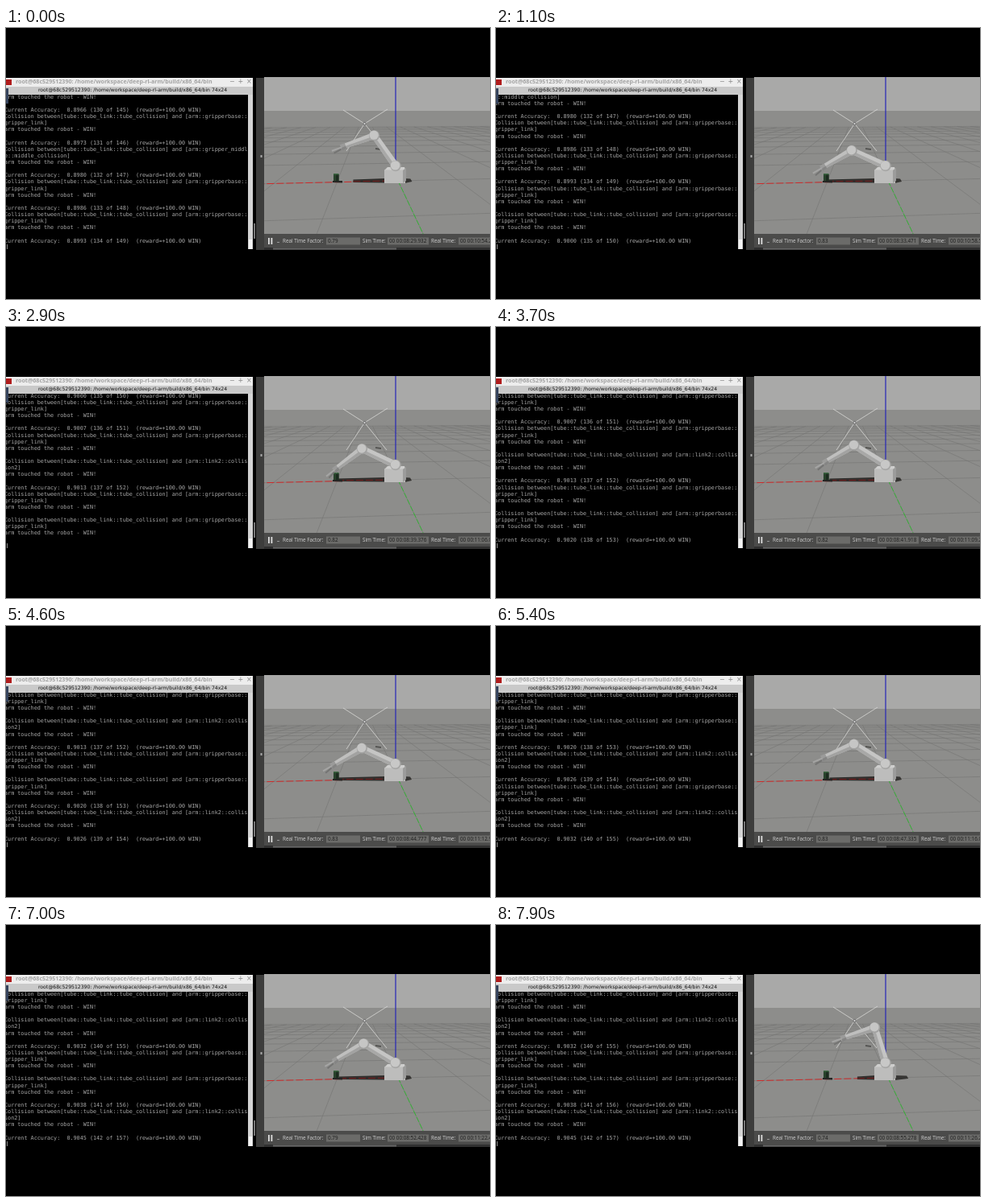
An HTML page with a canvas that plays this animation: 600 px wide and 337 px high, repeating every 8000 ms.

```html
<!DOCTYPE html>
<html lang="en">
<head>
<meta charset="utf-8">
<title>Arm training</title>
<style>
html, body { margin: 0; width: 100%; height: 100%; overflow: hidden; background: #000; }
canvas { display: block; }
</style>
</head>
<body>
<canvas id="stage" width="600" height="337"></canvas>
<script>
const ctx = document.getElementById('stage').getContext('2d');
const LOOP = 8000, STEP = 100;
const PATH = 'root@68c529512390: /home/workspace/deep-rl-arm/build/x86_64/bin';

// G, M, L: contact with a part of the arm; A: accuracy report. Times in seconds.
const HITS = {
  G: ['gripperbase::', 'gripper_link]'],
  M: ['gripper_middl', 'e::middle_collision]'],
  L: ['link2::collis', 'ion2]']
};
const EVENTS = [
  ...[...'AGAMAGAGA'].map(kind => [-1, kind]),
  [.75, 'G'], [.95, 'G'], [1, 'A'], [1.75, 'G'], [1.85, 'A'],
  [2.2, 'G'], [2.3, 'L'], [2.4, 'A'], [2.7, 'G'], [2.85, 'G'], [3, 'A'],
  [3.9, 'L'], [4, 'A'], [4.8, 'G'], [5, 'L'], [5.1, 'A'],
  [5.6, 'G'], [5.7, 'G'], [5.8, 'A'], [6.9, 'L'], [7, 'A']
];

// time, shoulder angle above the ground, forearm dip
const POSES = [
  [0, 55, 19.4], [.35, 40, 18], [.75, 27, 33], [.95, 25, 37], [1.1, 24.5, 30],
  [1.45, 33, 19], [1.7, 28, 33], [1.9, 32, 17.5], [2.25, 25, 36], [2.5, 32, 19],
  [2.8, 25.5, 37], [2.9, 25.5, 37], [3.3, 46, 18], [3.9, 25, 36], [4.2, 33, 18],
  [4.6, 25, 30], [5, 25, 37], [5.3, 35, 18], [5.65, 25, 37], [5.95, 32, 18],
  [6.3, 25, 17.8], [6.9, 25, 34], [7.3, 50, 18], [7.9, 73, 18.4], [8, 74, 18.4]
];
// time, simulated seconds, real seconds
const CLOCK = [
  [0, 509.932, 654.2], [1.1, 513.471, 658.5], [1.9, 516.077, 662], [2.9, 519.376, 666],
  [4.6, 524.777, 672.9], [6.3, 530.212, 679.5], [7.9, 535.278, 686.2], [8, 535.6, 686.6]
];
const FACTORS = [[0, .79], [1.1, .83], [1.9, .78], [2.9, .82], [4.6, .83], [6.3, .83], [7.9, .74], [8, .74]];

function sample(keys, t) {
  const i = Math.max(1, keys.findIndex(key => key[0] >= t));
  const [a, b] = [keys[i - 1], keys[i]];
  const p = (t - a[0]) / (b[0] - a[0]);
  return a.slice(1).map((v, j) => v + (b[j + 1] - v) * p);
}

function rect(color, x, y, w, h) {
  ctx.fillStyle = color;
  ctx.fillRect(x, y, w, h);
}
function poly(color, ...points) {
  ctx.fillStyle = color;
  ctx.beginPath();
  points.forEach(p => ctx.lineTo(...p));
  ctx.fill();
}
function line(color, width, a, b, dash = []) {
  ctx.strokeStyle = color;
  ctx.lineWidth = width;
  ctx.setLineDash(dash);
  ctx.beginPath();
  ctx.moveTo(...a);
  ctx.lineTo(...b);
  ctx.stroke();
}
function disc(color, [x, y], r) {
  ctx.fillStyle = color;
  ctx.beginPath();
  ctx.arc(x, y, r, 0, 7);
  ctx.fill();
}
function text(str, x, y, font, color) {
  ctx.font = font;
  ctx.fillStyle = color;
  ctx.fillText(str, x, y);
}
function clip(x, y, w, h, draw) {
  ctx.save();
  ctx.beginPath();
  ctx.rect(x, y, w, h);
  ctx.clip();
  draw();
  ctx.restore();
}

function logLines(t) {
  const touched = ['arm touched the robot - WIN!', ''];
  const lines = [...touched];
  let wins = 130;
  for (const [at, kind] of EVENTS) {
    if (at > t) break;
    if (kind === 'A') {
      const total = wins + 15;
      lines.push(`Current Accuracy:  ${(wins / total).toFixed(4)} (${wins} of ${total})  (reward=+100.00 WIN)`);
      wins++;
    } else {
      const [part, rest] = HITS[kind];
      lines.push('Collision between[tube::tube_link::tube_collision] and [arm::' + part, rest, ...touched);
    }
  }
  return lines.slice(-23);
}

function drawTerminal(t) {
  clip(0, 82, 300, 194, () => {
    logLines(t).forEach((str, i) =>
      text(str, -2, 86 + i * 8.13, '6.78px "DejaVu Sans Mono", monospace', '#a8a8a8'));
    line('#888', 1, [1.5, 269], [1.5, 275]);
  });
  rect('#ededed', 0, 62, 306, 11);
  rect('#c9c9c9', 0, 73, 306, 10);
  rect('#b01c1c', 0, 64, 7, 7);
  rect('#35435c', 0, 75, 3, 19);
  text(PATH, 12, 67.5, 'bold 7.1px "Open Sans", sans-serif', '#a3a3a3');
  text(PATH + ' 74x24', 40, 77.8, '6.1px "DejaVu Sans", sans-serif', '#111');
  ['−', '+', '×'].forEach((s, i) => text(s, 277 + i * 10.5, 67, '8px "DejaVu Sans", sans-serif', '#888'));
  rect('#d4d4d4', 300, 83, 6, 192);
  rect('#f4f4f4', 301, 263, 4, 12);
  rect('#777', 307, 243, 2, 19);
}

const ground = (u, k) => {
  const w = 1 + k / 3 + u * .019;
  return [445 + (41 + u * 75) / w, 103 + 87 / w];
};

function drawWorld() {
  rect('#a9a9a8', 320, 61, 280, 42);
  rect('#8d8d8b', 320, 103, 280, 153);
  for (let i = -10; i <= 10; i++) {
    line('#757573', .6, ground(i, -2), ground(i, 10));
    if (i > -3) line('#757573', .6, ground(-10, i), ground(10, i));
  }
  line('#d02a2a', 1, ground(-2.4, 0), ground(0, 0), [9, 3]);
  line('#35b535', 1, ground(0, 0), ground(0, -2), [7, 2]);
  line('#2626b8', 1.2, [483, 61], [483, 168]);
  for (const end of [[418, 102], [473, 101], [422, 153], [472, 153]])
    line('#d8d8d6', .8, [444.5, 119], end);
  disc('#777', [444.5, 119], 2.2);
  disc('#ddd', [444.5, 119], 1);
  line('#555553', 2, [458, 150], [465, 151]);
}

function link(a, b, wa, wb, color, shade) {
  const len = Math.hypot(b[0] - a[0], b[1] - a[1]);
  const nx = (a[1] - b[1]) / len, ny = (b[0] - a[0]) / len;
  const off = (p, w) => [p[0] + nx * w, p[1] + ny * w];
  poly(color, off(a, wa), off(b, wb), off(b, -wb), off(a, -wa));
  poly(shade, off(a, -wa * .1), off(b, -wb * .1), off(b, -wb), off(a, -wa));
}

function drawArm(t) {
  const [rise, dip] = sample(POSES, t).map(d => d * Math.PI / 180);
  const move = ([x, y], r, angle) => [x - r * Math.cos(angle), y + r * Math.sin(angle)];
  const shoulder = [483, 171.5];
  const elbow = move(shoulder, 46, -rise);
  const wrist = move(elbow, 38, dip);
  const grip = dip + .1;
  const palm = move(wrist, 6, grip);

  const left = 1.35 * elbow[0] - 186;
  poly('#302d2b', [left, 188.5], [471, 187], [471, 192.5], [left, 192]);
  line('#7c2020', 1, [left, 190.8], [471, 190.2], [9, 3]);
  const right = 503 + Math.max(0, elbow[0] - 456) * .6;
  poly('#363533', [493, 187], [right - 2, 187.5], [right, 191], [494, 193]);

  rect('#28432b', 406, 182, 6.5, 9.5);
  rect('#1c2c1f', 409, 182, 3.5, 9.5);
  rect('#3b6540', 406, 181, 6.5, 1.5);
  poly('#262624', [405, 190], [417, 190], [417, 192.5], [405, 192]);

  poly('#cfcfce', [469, 177], [473, 173], [494, 173], [495, 177]);
  rect('#bdbdbc', 469, 176.5, 26, 16.5);
  poly('#9c9c9b', [492, 177], [496, 174], [496, 190], [492, 193]);

  link(shoulder, elbow, 4.5, 4, '#c5c5c4', '#a8a8a7');
  link(elbow, wrist, 4.3, 3, '#bfbfbe', '#a2a2a1');
  link(wrist, palm, 3.5, 4, '#9b9b9a', '#858584');
  line('#a5a5a4', 2, move(palm, -1, grip + .3), move(palm, 12, grip - .12));
  line('#747473', 2, [palm[0], palm[1] + 2], move(palm, 11, grip + .22));
  disc('#a2a2a1', elbow, 6.6);
  disc('#c6c6c5', [elbow[0] - .5, elbow[1] - .6], 5.6);
  disc('#a6a6a5', shoulder, 6.8);
  disc('#c8c8c7', [shoulder[0] - .5, shoulder[1] - .6], 5.7);
}

function stamp(sec) {
  const pad = n => String(n).padStart(2, '0');
  return `00 00:${pad(Math.floor(sec / 60))}:${(sec % 60).toFixed(3).padStart(6, '0')}`;
}

function drawBar(t) {
  const font = '6.3px "Open Sans", sans-serif';
  const [sim, real] = sample(CLOCK, t);
  rect('#4b4b4a', 320, 256, 280, 17);
  rect('#303030', 320, 273, 280, 3);
  rect('#666', 331, 273.5, 153, 2);
  rect('#ddd', 325, 261, 1.8, 8);
  rect('#ddd', 328.5, 261, 1.8, 8);
  rect('#999', 336, 266, 3, 1);
  const fields = [
    ['Real Time Factor:', 343, 397, 42, sample(FACTORS, t)[0].toFixed(2)],
    ['Sim Time:', 442, 473, 51, stamp(sim)],
    ['Real Time:', 527, 561, 60, stamp(real)]
  ];
  for (const [label, x, box, width, value] of fields) {
    rect('#6b6b69', box, 260.5, width, 9);
    text(label, x, 265, font, '#d2d2d2');
    text(value, box + 2, 265, font, '#1d1d1d');
  }
}

function draw(t) {
  rect('#000', 0, 0, 600, 337);
  ctx.textBaseline = 'middle';
  drawTerminal(t);
  rect('#3d3d3c', 310, 62, 10, 214);
  rect('#aaa', 315.5, 158, 2, 3);
  clip(320, 61, 280, 195, () => {
    drawWorld();
    drawArm(t);
  });
  drawBar(t);
}

const start = performance.now();
function tick() {
  const ms = (performance.now() - start) % LOOP;
  draw(Math.floor(ms / STEP) * STEP / 1000);
  requestAnimationFrame(tick);
}
tick();
</script>
</body>
</html>
```
